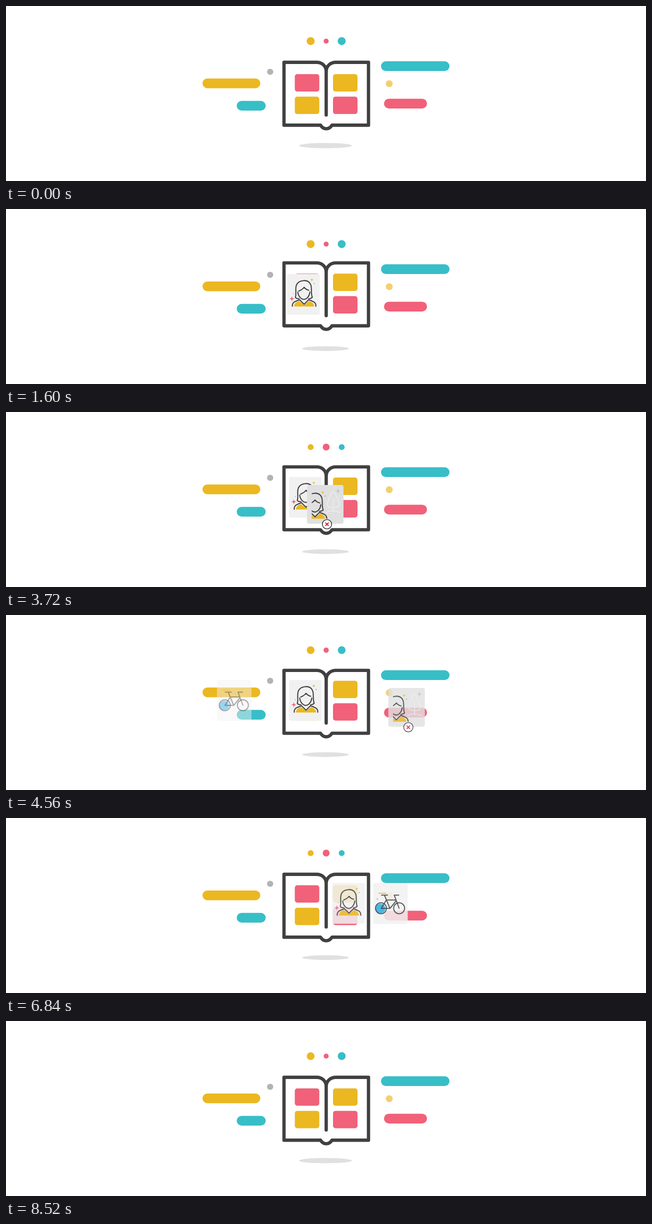
These frames come from a looping animation (1280x350 px, 8560 ms). An HTML page with a canvas:

```html
<!DOCTYPE html>
<html lang="en">
<head>
<meta charset="utf-8">
<title>Picture book</title>
<style>
  html, body { margin: 0; width: 100%; height: 100%; overflow: hidden; background: #fff; }
  canvas { display: block; width: 1280px; height: 350px; }
</style>
</head>
<body>
<canvas id="stage"></canvas>
<script>
const LOOP = 8560;
const INK = '#404040', YELLOW = '#ebb822', TEAL = '#38bec7', PINK = '#f16179', GREY = '#b3b3b3';
const canvas = document.getElementById('stage');
const ctx = canvas.getContext('2d');
const ratio = window.devicePixelRatio || 1;
canvas.width = 1280 * ratio;
canvas.height = 350 * ratio;

const clamp = v => Math.max(0, Math.min(1, v));
const progress = (t, from, to) => clamp((t - from) / (to - from));
const easeIn = u => u * u;
const easeOut = u => 1 - (1 - u) ** 3;
const easeBoth = u => (1 - Math.cos(Math.PI * u)) / 2;

// Value at time t on a track of [time, value] keys.
function track(t, keys, ease = easeBoth) {
  const i = keys.findIndex(key => key[0] > t);
  if (i < 0) return keys[keys.length - 1][1];
  if (i === 0) return keys[0][1];
  const [t0, v0] = keys[i - 1], [t1, v1] = keys[i];
  return v0 + (v1 - v0) * ease((t - t0) / (t1 - t0));
}

const BOOK_Y = [[0, 0], [900, -9.5], [1760, -4.4], [2400, -3.5], [7000, 0], [7800, -9], [8520, 0]];
const TILES_Y = [[0, 0], [880, -7.2], [2400, -7], [3720, -5.2], [7520, -1.5], [LOOP, -1.6]];
const SHADOW_RX = [[0, 53], [880, 49], [1760, 47], [7080, 47], [7520, 43], [8500, 53]];
const BEATS = [[1560, 1], [2200, 0], [2560, 0], [3120, 1], [3680, 0], [4120, 0],
  [4680, 1], [5240, 0], [5680, 0], [6240, 1], [6800, 0]];
const YELLOW_R = [[0, 8], [880, 5.2], [1560, 8]];
const PINK_R = [[0, 5], [880, 7.6], [1560, 5]];
const YELLOW_END = [[6800, 5.9], [7480, 8], [LOOP, 7.8]];
const PINK_END = [[6800, 6.9], [7480, 5], [LOOP, 5]];
const TEAL_END = [[6800, 5.9], [7480, 5.5], [8400, 7.9]];

function disc(x, y, r, fill, line, width) {
  ctx.beginPath();
  ctx.arc(x, y, r, 0, 2 * Math.PI);
  if (fill) { ctx.fillStyle = fill; ctx.fill(); }
  if (line) { ctx.strokeStyle = line; ctx.lineWidth = width; ctx.stroke(); }
}

function box(x, y, w, h, r, fill) {
  ctx.beginPath();
  ctx.roundRect(x, y, w, h, r);
  ctx.fillStyle = fill;
  ctx.fill();
}

function line(d, color, width) {
  ctx.strokeStyle = color;
  ctx.lineWidth = width;
  ctx.stroke(new Path2D(d));
}

function shape(d, color) {
  ctx.fillStyle = color;
  ctx.fill(new Path2D(d));
}

function star(x, y, r, color) {
  const q = r * 0.25;
  shape(`M${x} ${y - r}L${x + q} ${y - q}L${x + r} ${y}L${x + q} ${y + q}L${x} ${y + r}` +
    `L${x - q} ${y + q}L${x - r} ${y}L${x - q} ${y - q}Z`, color);
}

function moved(dx, dy, alpha, draw) {
  if (alpha <= 0) return;
  ctx.save();
  ctx.globalAlpha *= alpha;
  ctx.translate(dx, dy);
  draw();
  ctx.restore();
}

function backdrop() {
  box(393, 145, 115.6, 19.4, 9.7, YELLOW);
  box(461.4, 189.8, 58, 19.4, 9.7, TEAL);
  box(750, 110.6, 137, 19.4, 9.7, TEAL);
  box(756, 185.5, 86, 19.4, 9.7, PINK);
  disc(528.3, 131.6, 6.2, GREY);
  disc(766.5, 155.3, 6.9, '#f3cf70');
}

function dots(t) {
  let yellow, pink, teal;
  if (t < 1560) {
    yellow = teal = track(t, YELLOW_R);
    pink = track(t, PINK_R);
  } else if (t < 6800) {
    const beat = track(t, BEATS);
    yellow = teal = 5.9 + 2.1 * beat;
    pink = 6.9 - 1.9 * beat;
  } else {
    yellow = track(t, YELLOW_END);
    pink = track(t, PINK_END);
    teal = track(t, TEAL_END);
  }
  disc(609.3, 70.2, yellow, YELLOW);
  disc(640.3, 70.2, pink, PINK);
  disc(671.4, 70.2, teal, TEAL);
}

function shadow(t) {
  const rx = track(t, SHADOW_RX);
  ctx.beginPath();
  ctx.ellipse(639, 279.2, rx, rx / 10, 0, 0, 2 * Math.PI);
  ctx.fillStyle = '#e0e0e0';
  ctx.fill();
}

function book() {
  line('M640.4 218V131C640.4 120 632 112.6 621 112.6H556V238.4H629' +
    'C632 243 636 245.5 640.4 245.5S649 243 652 238.4H725V112.6H660C649 112.6 640.4 120 640.4 131', INK, 6.6);
}

function tiles() {
  box(577.6, 136.3, 49, 34.8, 5, PINK);
  box(654, 136.3, 49, 34.8, 5, YELLOW);
  box(577.6, 181.3, 49, 34.8, 5, YELLOW);
  box(654, 181.3, 49, 34.8, 5, PINK);
}

function portrait() {
  shape('M580 195C580 189 583 187 590 184L600 192L610 184C617 187 620 189 620 195Z', YELLOW);
  line('M576.5 194.5C576 187 580 185.5 591 181.5L600 190.5L609 181.5C620 185.5 624 187 623.5 194.5', INK, 2.1);
  line('M590 179.5C586 179.5 583.5 178.5 582.5 176.5C584.5 172 583 166 583.5 158C584 147 591 144.5 597 143.5' +
    'C607 141.5 614 147 614.5 158C615 166 614 172 616.5 176.5C614.5 178.5 612 179.5 609 179.5', INK, 2.1);
  line('M587.5 166C588 174 594 180.8 599.6 180.8S611 174 611.6 166', INK, 2.1);
  line('M589.5 164Q597 161 600 156.5Q604 161.5 609.5 162.5', INK, 2.1);
  star(615.6, 141.6, 3.3, YELLOW);
  disc(620.2, 149, 1.3, GREY);
  star(575.6, 179.6, 5, PINK);
  disc(578.5, 169.5, 1, GREY);
}

function portraitCard() {
  box(566, 130, 65.5, 81.6, 4, '#f1f1f1');
  portrait();
}

function croppedCard() {
  box(602, 146, 73, 77.6, 4, '#e0e0e0');
  line('M654.5 158C649 164 642 180 643 187Q644 191 654.5 191T666 187C667 180 660 164 654.5 158' +
    'M654.5 175V199M641 201Q654 194 668 201', '#ededed', 1.7);
  star(664, 158, 5, '#c6c6c6');
  ctx.save();
  ctx.beginPath();
  ctx.rect(611.5, 155, 40, 58.5);
  ctx.clip();
  ctx.translate(18, 19.3);
  portrait();
  ctx.restore();
}

function bikeCard() {
  box(648.5, 130, 69, 82, 4, '#f1f1f1');
  disc(663, 181, 9.6, '#29abe2');
  disc(664, 180.5, 11, null, INK, 1.9);
  disc(700.3, 180.5, 11, null, INK, 1.9);
  line('M665 154.2H677M671 154.5L682 180.8H664.5L674.8 164H693.5M694 166L682 180.8' +
    'M699.5 154.3H690.5L700.3 180.5', INK, 2);
  line('M659.5 150.4H674', YELLOW, 2);
  disc(656.6, 162, 1.5, GREY);
}

function badge(x, y, size, mark, color) {
  if (size <= 0) return;
  ctx.save();
  ctx.translate(x, y);
  ctx.scale(size, size);
  disc(0, 0, 9.3, '#fff', INK, 1.6);
  line(mark, color, 2.1);
  ctx.restore();
}

function cards(t) {
  const leave = progress(t, 6360, 7140);
  const leaveX = 226 * easeIn(leave);
  const leaveAlpha = 1 - progress(leave, 0.55, 1);

  if (t >= 960 && t < 7140) {
    const x = -229 * (1 - easeOut(progress(t, 960, 1760))) - 2 * (1 - progress(t, 2300, 3000));
    moved(x + leaveX, 0, progress(t, 940, 1160) * leaveAlpha, portraitCard);
  }

  if (t >= 2680 && t < 4740) {
    const x = -210 * (1 - easeOut(progress(t, 2680, 3480))) + 268 * easeIn(progress(t, 4000, 4720));
    const alpha = progress(t, 2660, 2880) * (1 - progress(t, 4520, 4740));
    moved(x, 0, alpha, () => {
      croppedCard();
      badge(642, 224.5, easeOut(progress(t, 3440, 3640)), 'M-2.6-2.6L2.6 2.6M2.6-2.6L-2.6 2.6', '#d4213d');
    });
  }

  if (t >= 4480 && t < 7140) {
    const x = -312 * (1 - easeOut(progress(t, 4480, 5280)));
    moved(x + leaveX, 0, progress(t, 4460, 4680) * leaveAlpha, () => {
      bikeCard();
      const size = easeOut(progress(t, 5240, 5440)) * (1 - progress(t, 6080, 6240));
      badge(682, 211.2, size, 'M-4 .5L-1.2 3L4.2-2.6', TEAL);
    });
  }

  // Faint edge left behind by the departing card.
  if (t >= 7140 && t < 7920) box(941.3, 132, 1, 77, 0, '#f3f3f3');
}

function draw(now) {
  const t = now % LOOP;
  ctx.setTransform(ratio, 0, 0, ratio, 0, 0);
  ctx.fillStyle = '#fff';
  ctx.fillRect(0, 0, 1280, 350);
  ctx.lineCap = ctx.lineJoin = 'round';
  backdrop();
  dots(t);
  shadow(t);
  moved(0, track(t, BOOK_Y), 1, book);
  moved(0, track(t, TILES_Y), 1, tiles);
  cards(t);
}

const start = performance.now();
function tick() {
  draw(performance.now() - start);
  requestAnimationFrame(tick);
}
tick();
</script>
</body>
</html>
```
